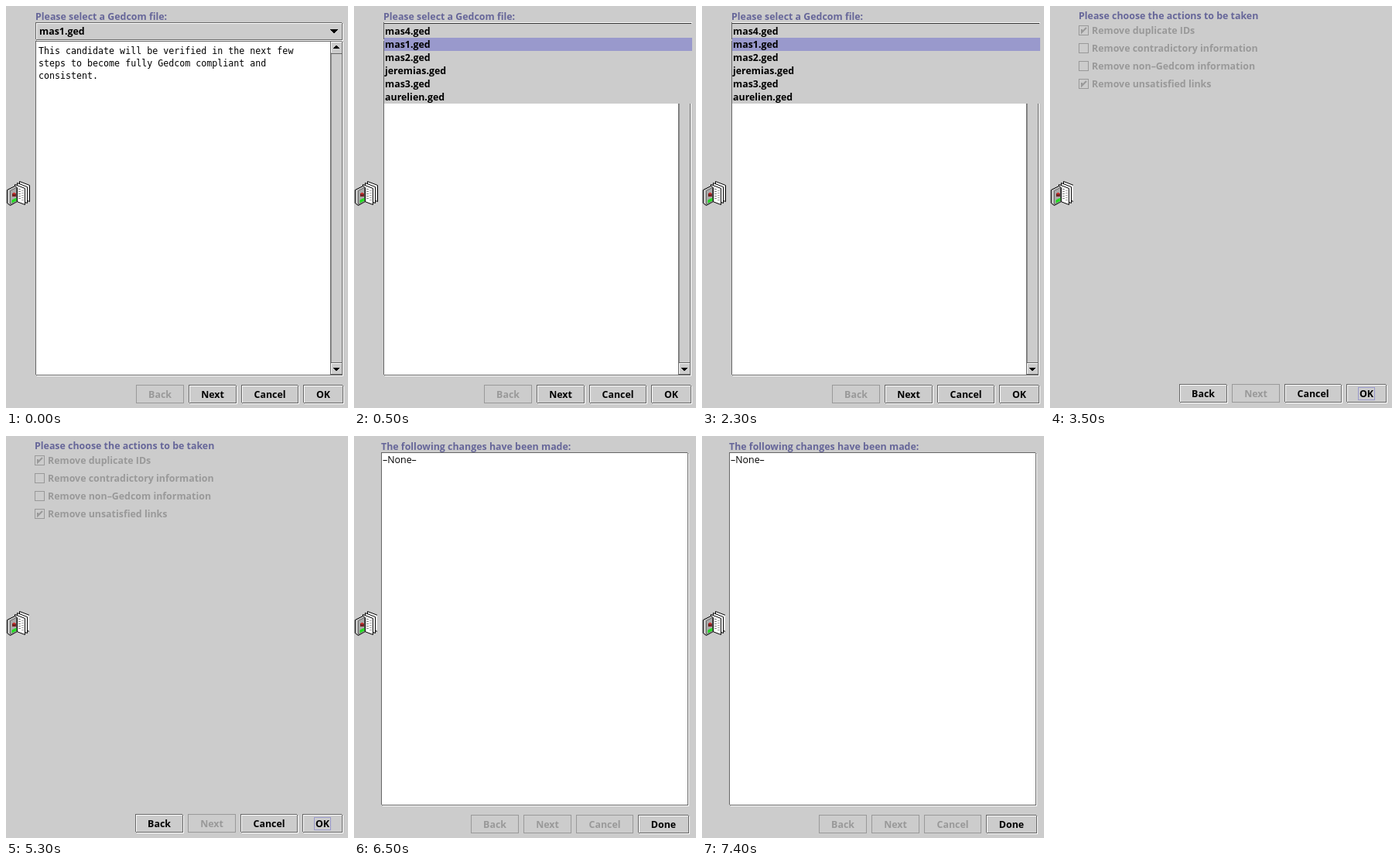
These frames come from a looping animation (442x519 px, 8 s). An HTML page with a canvas:

```html
<!DOCTYPE html>
<html lang="en">
<head>
<meta charset="utf-8">
<title>Gedcom wizard</title>
<style>
html, body { margin: 0; width: 100%; height: 100%; overflow: hidden; background: #ccc; }
canvas { display: block; }
</style>
</head>
<body>
<canvas id="stage" width="442" height="519"></canvas>
<script>
const ctx = document.getElementById('stage').getContext('2d', { alpha: false });
const LOOP = 8000;
const GREY = '#cccccc', SHADE = '#666666', FADED = '#999999', LABEL = '#666699', PICK = '#9999cc';
const BOLD = 'bold 12.4px "Open Sans", sans-serif';
const PLAIN = '12.4px "Open Sans", sans-serif';
const MONO = '11.65px "DejaVu Sans Mono", monospace';

function fill(x, y, w, h, color) {
  ctx.fillStyle = color;
  ctx.fillRect(x, y, w, h);
}

function outline(x, y, w, h, color) {
  ctx.strokeStyle = color;
  ctx.lineWidth = 1;
  ctx.strokeRect(x + 0.5, y + 0.5, w - 1, h - 1);
}

// Etched frame: a white outline shifted by one pixel below a dark one, with two softened corners.
function etched(x, y, w, h) {
  outline(x + 1, y + 1, w - 1, h - 1, '#fff');
  outline(x, y, w - 1, h - 1, SHADE);
  fill(x, y + h - 2, 1, 1, GREY);
  fill(x + 1, y + h - 1, 1, 1, GREY);
  fill(x + w - 2, y, 1, 1, GREY);
  fill(x + w - 1, y + 1, 1, 1, GREY);
}

function text(str, x, y, color = '#000', font = BOLD, align = 'left') {
  ctx.font = font;
  ctx.textAlign = align;
  ctx.fillStyle = color;
  ctx.fillText(str, x, y);
}

function shape(points, color, line) {
  ctx.beginPath();
  points.forEach(([x, y]) => ctx.lineTo(x + 0.5, y + 0.5));
  ctx.closePath();
  ctx.fillStyle = color;
  ctx.fill();
  if (line) {
    ctx.strokeStyle = line;
    ctx.lineWidth = 1;
    ctx.stroke();
  }
}

// Arrowhead built from rows; dir is 1 for down and -1 for up.
function arrow(cx, tip, rows, dir) {
  for (let i = 0; i < rows; i++) fill(cx - i - 1, tip - dir * i, 2 * i + 2, 1, '#000');
}

function button(label, x, y, w, enabled = true) {
  if (enabled) etched(x, y, w + 1, 25);
  else outline(x, y, w, 24, FADED);
  text(label, x + w / 2, y + 17, enabled ? '#000' : FADED, BOLD, 'center');
}

function album(width) {
  ctx.save();
  ctx.beginPath();
  ctx.rect(0, 224, width, 36);
  ctx.clip();
  for (let i = 2; i >= 0; i--) {
    const x = 11 + i * 3, y = 230 - i * 2;
    shape([[x, y], [x + 13, y + 5], [x + 13, y + 26], [x, y + 21]], '#fff', '#000');
  }
  for (let y = 236; y < 251; y += 3) {
    fill(16, y, 3, 1, '#888');
    fill(20, y + 2, 3, 1, '#aaa');
  }
  shape([[1, 237], [11, 232], [14, 234], [14, 252], [5, 257], [1, 254]], '#c4c4c4', '#000');
  shape([[5, 238], [13, 234], [13, 252], [5, 256]], '#aaa', SHADE);
  fill(8, 242, 5, 4, '#722');
  fill(9, 241, 3, 2, '#c33');
  shape([[7, 250], [13, 247], [13, 251], [7, 254]], '#22dd22');
  ctx.restore();
}

function scrollbar() {
  fill(419, 46, 15, 430, GREY);
  fill(419, 46, 1, 430, SHADE);
  fill(420, 62, 1, 398, FADED);
  [46, 461].forEach(y => {
    fill(420, y, 14, 1, '#fff');
    fill(420, y, 1, 14, '#fff');
  });
  [61, 460, 475].forEach(y => fill(420, y, 14, 1, SHADE));
  arrow(427, 51, 4, -1);
  arrow(427, 470, 4, 1);
}

function selectPage() {
  album(34);
  text('Please select a Gedcom file:', 38, 18, LABEL);
  etched(38, 21, 398, 24);
  text('mas1.ged', 43, 37);
  arrow(424, 34, 5, 1);
  etched(38, 45, 398, 433);
  fill(39, 46, 380, 430, '#fff');
  scrollbar();
  button('Back', 168, 489, 62, false);
  button('Next', 236, 489, 62);
  button('Cancel', 304, 489, 74);
  button('OK', 384, 489, 52);
}

function candidatePage() {
  selectPage();
  [
    'This candidate will be verified in the next few',
    'steps to become fully Gedcom compliant and',
    'consistent.'
  ].forEach((line, i) => text(line, 42, 62 + 16 * i, '#000', MONO));
}

function listPage() {
  selectPage();
  fill(39, 20, 398, 106, GREY);
  fill(39, 21, 398, 1, '#fff');
  fill(39, 22, 397, 1, '#333');
  fill(39, 41, 398, 17, PICK);
  ['mas4', 'mas1', 'mas2', 'jeremias', 'mas3', 'aurelien']
    .forEach((name, i) => text(name + '.ged', 40, 37 + 17 * i));
}

function checkbox(label, y, checked) {
  outline(37, y, 13, 13, FADED);
  if (checked) {
    ctx.strokeStyle = FADED;
    ctx.lineWidth = 2;
    ctx.beginPath();
    ctx.moveTo(41, y + 5);
    ctx.lineTo(41, y + 9);
    ctx.lineTo(47, y + 3);
    ctx.stroke();
  }
  text(label, 54, y + 11, FADED);
}

function actionsPage() {
  album(30);
  text('Please choose the actions to be taken', 37, 17, LABEL);
  checkbox('Remove duplicate IDs', 25, true);
  checkbox('Remove contradictory information', 48, false);
  checkbox('Remove non–Gedcom information', 71, false);
  checkbox('Remove unsatisfied links', 94, true);
  button('Back', 167, 488, 62);
  button('Next', 235, 488, 62, false);
  button('Cancel', 303, 488, 74);
  button('OK', 383, 488, 52);
  outline(398, 492, 22, 17, PICK);
}

function resultPage() {
  album(30);
  text('The following changes have been made:', 35, 18, LABEL);
  etched(35, 21, 398, 457);
  fill(36, 22, 395, 454, '#fff');
  text('–None–', 37, 35, '#000', PLAIN);
  button('Back', 151, 489, 62, false);
  button('Next', 219, 489, 62, false);
  button('Cancel', 287, 489, 74, false);
  button('Done', 367, 489, 66);
}

const pages = [[6500, resultPage], [3500, actionsPage], [500, listPage], [0, candidatePage]];

function render() {
  const time = performance.now() % LOOP;
  fill(0, 0, 442, 519, GREY);
  pages.find(([start]) => time >= start)[1]();
  requestAnimationFrame(render);
}
render();
</script>
</body>
</html>
```
